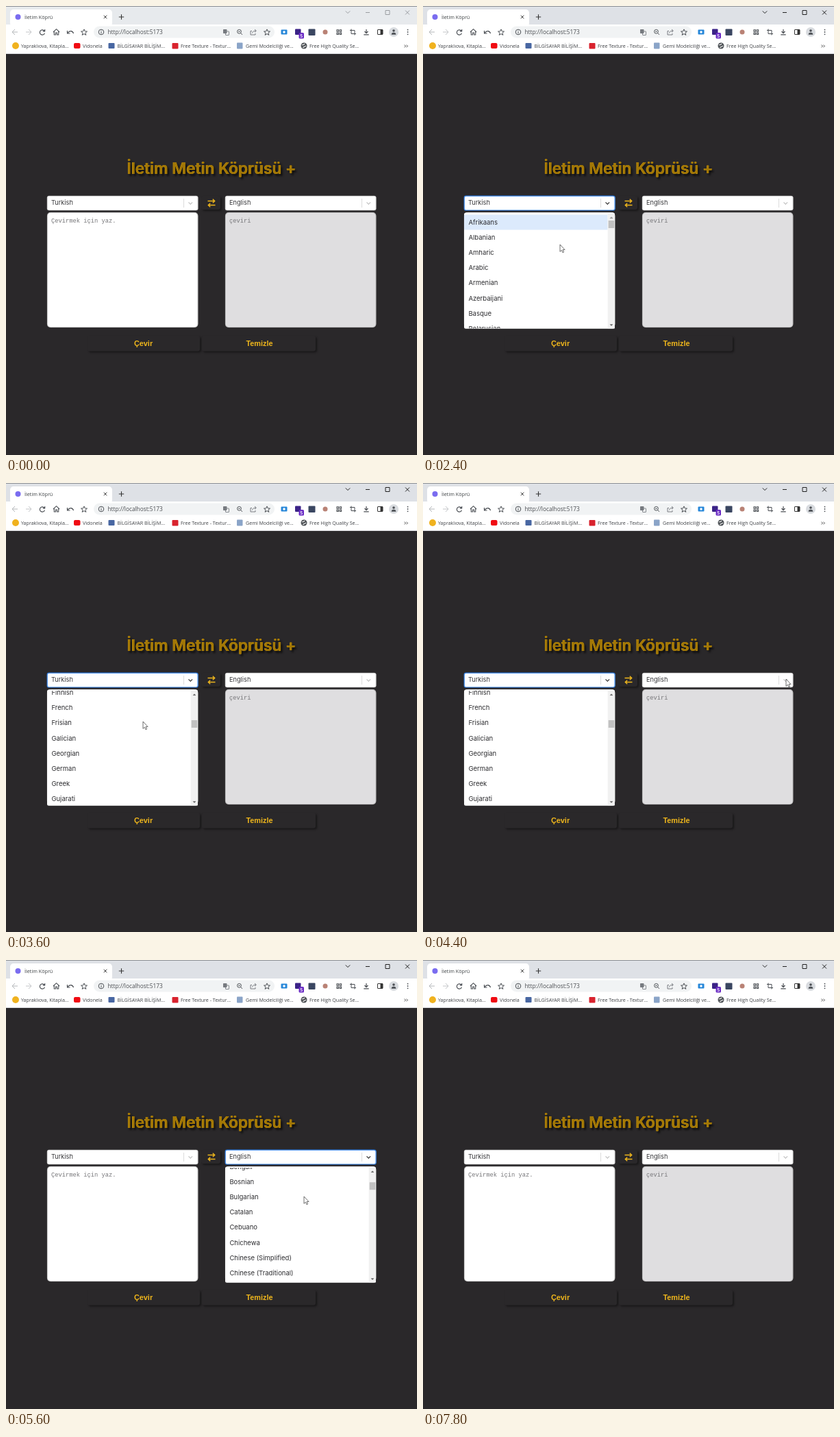
An HTML page with a canvas for the animation above (8 s loop, 600 by 655 pixels).

```html
<!DOCTYPE html>
<html lang="tr">
<head>
<meta charset="utf-8">
<title>İletim Köprü</title>
<style>
html, body { margin: 0; width: 100%; height: 100%; overflow: hidden; background: #2a282a; }
canvas { display: block; width: 600px; height: 655px; }
</style>
</head>
<body>
<canvas id="stage" width="600" height="655"></canvas>
<script>
const ctx = document.getElementById('stage').getContext('2d');
const LOOP = 8000, STEP = 200, PITCH = 22.13;
const PAGE = '#2a282a', INK = '#4b4f54', GOLD = '#f0b71c';
const UI = '"Open Sans", sans-serif', BODY = 'Inter, sans-serif';
const MONO = '"Liberation Mono", monospace', BUTTON = '"Liberation Sans", sans-serif';

const languages = ('Afrikaans,Albanian,Amharic,Arabic,Armenian,Azerbaijani,Basque,Belarusian,' +
  'Bengali,Bosnian,Bulgarian,Catalan,Cebuano,Chichewa,Chinese (Simplified),' +
  'Chinese (Traditional),Corsican,Croatian,Czech,Danish,Dutch,English,Esperanto,Estonian,' +
  'Filipino,Finnish,French,Frisian,Galician,Georgian,German,Greek,Gujarati,Haitian Creole,' +
  'Hausa,Hawaiian,Hebrew,Hindi,Hmong,Hungarian').split(',');

// Keyframes: time, then values
const pointerKeys = [
  [400, 382, 191], [800, 300, 262], [1200, 262, 287], [1400, 262, 287], [1800, 200, 348],
  [3800, 200, 348], [4400, 530, 286], [4800, 537, 283], [5200, 435, 345],
  [6200, 435, 345], [6800, 464, 213.5], [7000, 464, 213.5], [7600, 240, 290]
];
const leftScroll = [[2400, 0], [3600, 563]];
const rightScroll = [[5200, 0], [5600, 191], [6200, 438]];

function along(keys, t) {
  if (t <= keys[0][0]) return keys[0].slice(1);
  for (let i = 1; i < keys.length; i++) {
    const a = keys[i - 1], b = keys[i];
    if (t <= b[0]) {
      const p = (t - a[0]) / (b[0] - a[0]);
      return a.slice(1).map((v, j) => v + (b[j + 1] - v) * p);
    }
  }
  return keys[keys.length - 1].slice(1);
}

function box(x, y, w, h, fill, r = 0) {
  ctx.beginPath();
  ctx.roundRect(x, y, w, h, r);
  ctx.fillStyle = fill;
  ctx.fill();
}

function outline(x, y, w, h, color, r = 0, width = 1) {
  ctx.beginPath();
  ctx.roundRect(x, y, w, h, r);
  ctx.strokeStyle = color;
  ctx.lineWidth = width;
  ctx.stroke();
}

function disc(x, y, r, fill) {
  ctx.beginPath();
  ctx.arc(x, y, r, 0, 7);
  ctx.fillStyle = fill;
  ctx.fill();
}

function ring(x, y, r, color, from = 0, to = 2 * Math.PI, width = 1) {
  ctx.beginPath();
  ctx.arc(x, y, r, from, to);
  ctx.strokeStyle = color;
  ctx.lineWidth = width;
  ctx.stroke();
}

// Strokes an SVG path relative to a point
function icon(x, y, d, color = INK, width = 1, fill) {
  const path = new Path2D(d);
  ctx.save();
  ctx.translate(x, y);
  if (fill) { ctx.fillStyle = fill; ctx.fill(path); }
  ctx.strokeStyle = color;
  ctx.lineWidth = width;
  ctx.stroke(path);
  ctx.restore();
}

function text(str, x, y, size, color, family, weight = 400, align = 'left') {
  ctx.font = `${weight} ${size}px ${family}`;
  ctx.textAlign = align;
  ctx.fillStyle = color;
  ctx.fillText(str, x, y);
}

function shadowed(draw, offset, blur, color) {
  ctx.save();
  ctx.shadowOffsetX = ctx.shadowOffsetY = offset;
  ctx.shadowBlur = blur;
  ctx.shadowColor = color;
  draw();
  ctx.restore();
}

const STAR = 'M0-4.5 L1.3-1.5 4.5-1.3 2 .8 2.8 4 0 2.2 -2.8 4 -2 .8 -4.5-1.3 -1.3-1.5Z';

function tabStrip(active) {
  const control = active ? '#222' : '#9a9da1';
  box(0, 0, 600, 28, active ? '#dee1e6' : '#e7eaed');
  box(0, 0, 600, 1, '#8d9094');
  box(6, 5, 149, 25, '#fff', 5);
  disc(17.5, 16, 4, '#7a6cf0');
  text('İletim Köprü', 27, 18.6, 7.2, '#3c4043', UI);
  icon(145, 16, 'M-2.3-2.3 2.3 2.3M2.3-2.3-2.3 2.3', '#444', 1);
  icon(168.5, 16, 'M-3.7 0H3.7M0-3.7V3.7', '#333', 1.1);
  icon(499, 9, 'M-3.2-1.6 0 1.6 3.2-1.6', control);
  icon(528, 9.5, 'M-3 0H3', control);
  outline(554, 6.5, 6, 6, control);
  icon(586, 9.5, 'M-3-3 3 3M3-3-3 3', control);
}

function toolbar() {
  box(0, 27, 600, 43, '#fff');
  box(0, 69, 600, 1, '#dadce0');
  icon(13, 38, 'M4 0H-4M0-4-4 0 0 4', '#b4b7ba');
  icon(33, 38, 'M-4 0H4M0-4 4 0 0 4', '#c3c5c8');
  ring(53, 38.5, 3.6, INK, 0.3, 5.4, 1.2);
  icon(53, 38, 'M4-4V-.8H.8Z', INK, 0.5, INK);
  icon(73.5, 38, 'M-4.5 0 0-4.3 4.5 0M-3.2-1V4H-1V1H1V4H3.2V-1', INK, 1.1);
  icon(94, 38, 'M-4.5-2V2H-.5M-4 1.5C-1-3 3-2 4.6 2', INK, 1.2);
  icon(114, 38.4, STAR);

  box(128, 29.5, 264, 17, '#f1f3f4', 8.5);
  ring(139, 38, 3.8, INK);
  icon(139, 38, 'M0-.5V2.2M0-2.2V-1.3', INK);
  text('http://localhost:5173', 148.5, 41, 8.3, '#4a4d51', UI);
  box(317, 34, 5.5, 6, '#777b80', 0.7);
  outline(320.5, 37, 5, 5.5, '#777b80', 0.5, 0.9);
  ring(340.5, 37.3, 2.9, INK);
  icon(340.5, 37.3, 'M2 2 4.5 4.6M-1.3 0H1.3', INK);
  icon(361, 38, 'M-2-1.5H-4V4H3V2M-1.5 1.5C-1-1 1-1.8 4-1.8M2-4 4.3-1.8 2 .4', '#6b6f74', 0.9);
  icon(381, 38.4, STAR);

  box(401.5, 34.5, 9, 7, '#2787d9', 1);
  disc(406, 38, 1.8, '#fff');
  box(422, 33.5, 8.5, 8.5, '#3b2387', 1);
  box(427.5, 39, 7.5, 8.5, '#6a2bc4', 1.5);
  text('5', 431.2, 46, 7, '#fff', UI, 600, 'center');
  box(441.5, 33.5, 10, 9.5, '#3a4661', 1);
  disc(466, 38, 3.5, '#b98275');
  for (let i = 0; i < 4; i++) {
    outline(483 + (i % 2) * 4.2, 34.8 + (i >> 1) * 4.2, 2.4, 2.4, INK, 0, 1.1);
  }
  icon(506.5, 38, 'M-2.5-4.5V2.5H4.5M-4.5-2.5H2.5V4.5', INK);
  icon(526, 38, 'M0-4V1.5M-2.5-1 0 1.6 2.5-1M-3.7 3.8H3.7', INK, 1.2);
  outline(542.5, 34.5, 7.5, 7, '#333', 0.5);
  box(546.5, 34.5, 3.5, 7, '#333');
  disc(566, 38, 7, '#d9dce0');
  disc(566, 36, 1.8, INK);
  box(562.7, 38.7, 6.6, 3, INK, [3, 3, 0, 0]);
  for (const y of [34.7, 38, 41.3]) disc(586.5, y, 0.9, INK);

  const mark = (label, x) => text(label, x, 60.7, 7.1, '#404347', UI);
  disc(14, 58, 5, '#f0b21f');
  mark('Yapraklıova, Kitapla...', 22);
  box(99, 54, 9.5, 8, '#f00b12', 2);
  mark('Vidonela', 112);
  box(149.5, 54, 9, 8, '#4867a2', 1);
  mark('BİLGİSAYAR BİLİŞİM...', 162.5);
  box(242.5, 54, 9, 8.5, '#d9232e', 1);
  mark('Free Texture - Textur...', 255);
  box(337, 53.5, 8.5, 9, '#8aa4c8', 1);
  mark('Gemi Modelciliği ve...', 350);
  disc(435, 58, 4.5, '#505458');
  icon(435, 58, 'M-3-1.5C-1-.5 0-2 1-3M-1.5 3C-1 1 2 1.5 3 0', '#fff', 1.1);
  mark('Free High Quality Se...', 443);
  icon(584, 58.5, 'M-2.3-1.8-.5 0-2.3 1.8M.5-1.8 2.3 0 .5 1.8', '#333', 0.9);
}

function title() {
  const put = (shift, color) =>
    text('İletim Metin Köprüsü +', 300 + shift, 245 + shift, 22.7, color, BODY, 600, 'center');
  shadowed(() => put(0, '#8b6704'), 2.5, 3, 'rgba(0,0,0,.75)');
  put(-0.4, '#c4930c');
  put(0.3, '#a27706');
}

function button(x, y, w, h) {
  shadowed(() => box(x, y, w, h, PAGE, 3), 2, 3, 'rgba(0,0,0,.42)');
}

function buttons() {
  button(285, 277, 28, 20);
  icon(300, 287.5, 'M-5.5-3H4.5M1.8-5.7 4.7-3 1.8-.3M5.5 3H-4.5M-1.8 .3-4.7 3-1.8 5.7', GOLD, 1.4);
  button(119, 481, 164, 22.5);
  button(286, 481, 166, 22.5);
  text('Çevir', 200.5, 496.3, 10.9, GOLD, BUTTON, 700, 'center');
  text('Temizle', 370, 496.3, 10.9, GOLD, BUTTON, 700, 'center');
}

function select(x, value, open, caret) {
  box(x, 277, 220.3, 21, '#fff', 2.5);
  outline(x + 0.2, 277.2, 219.9, 20.8, open ? '#2f7fe6' : '#bbb', 2.5, open ? 1.2 : 0.7);
  text(value, x + 6, 290.2, 9.2, '#37373a', BODY);
  box(x + 199, 281, 0.8, 13, '#d4d4d4');
  icon(x + 209.3, 287.8, 'M-2.8-1.4 0 1.4 2.8-1.4', open ? '#333' : '#c2c2c2', 1.3);
  if (caret) box(x + 5.5, 281.5, 1, 12, '#222');
}

function area(x, hint, fill) {
  box(x, 301, 220.3, 168, fill, 5);
  outline(x + 0.3, 301.3, 219.7, 167.4, '#9a9a9a', 5, 0.6);
  text(hint, x + 6, 315.7, 8.75, '#77777a', MONO);
}

function menu(x, scroll, selected) {
  box(x, 301.5, 220, 169.2, '#fff', 2.5);
  ctx.save();
  ctx.beginPath();
  ctx.rect(x, 303, 220, 167.3);
  ctx.clip();
  languages.forEach((name, i) => {
    const mid = 315.7 + i * PITCH - scroll;
    if (mid < 285 || mid > 490) return;
    const chosen = name === selected;
    if (chosen || i === 0) box(x, mid - 11.3, 209.5, 22.2, chosen ? '#2680fa' : '#dceafc');
    text(name, x + 6.4, mid + 3.2, 9.5, chosen ? '#fff' : '#2d2d30', BODY);
  });
  box(x + 209.7, 303, 10.3, 168, '#f1f1f1');
  box(x + 210.7, 313 + scroll * 0.0585, 8.6, 11, '#c1c1c1');
  icon(x + 215, 308.7, 'M-2 1 0-1 2 1Z', '#555', 0.3, scroll ? '#505050' : '#a3a3a3');
  icon(x + 215, 465.5, 'M-2-1 0 1 2-1Z', '#505050', 0.3, '#505050');
  ctx.restore();
}

function pointer(x, y) {
  icon(x, y, 'M0 0V10.4L2.3 8.2 4 11.8 5.6 11 4 7.6H7.1Z', '#333', 0.7, '#fff');
}

function render(t) {
  const leftOpen = t >= 1400 && t < 4600;
  const rightOpen = t >= 4600 && t < 7000;
  const blink = t % 1000 >= 700 || t % 1000 < 200;

  box(0, 0, 600, 655, PAGE);
  tabStrip(t >= 200);
  toolbar();
  title();
  buttons();
  select(60, 'Turkish', leftOpen, leftOpen && blink);
  select(320, 'English', rightOpen, rightOpen && blink);
  area(60, 'Çevirmek için yaz.', '#fff');
  area(320, 'çeviri', '#dfdee0');
  if (leftOpen) menu(60, along(leftScroll, t)[0], 'Turkish');
  if (rightOpen) menu(320, along(rightScroll, t)[0], 'English');
  if (t >= 400 && t < 7800) pointer(...along(pointerKeys, t));
}

function tick() {
  const t = performance.now() % LOOP;
  render(Math.floor(t / STEP) * STEP);
  requestAnimationFrame(tick);
}
tick();
</script>
</body>
</html>
```
